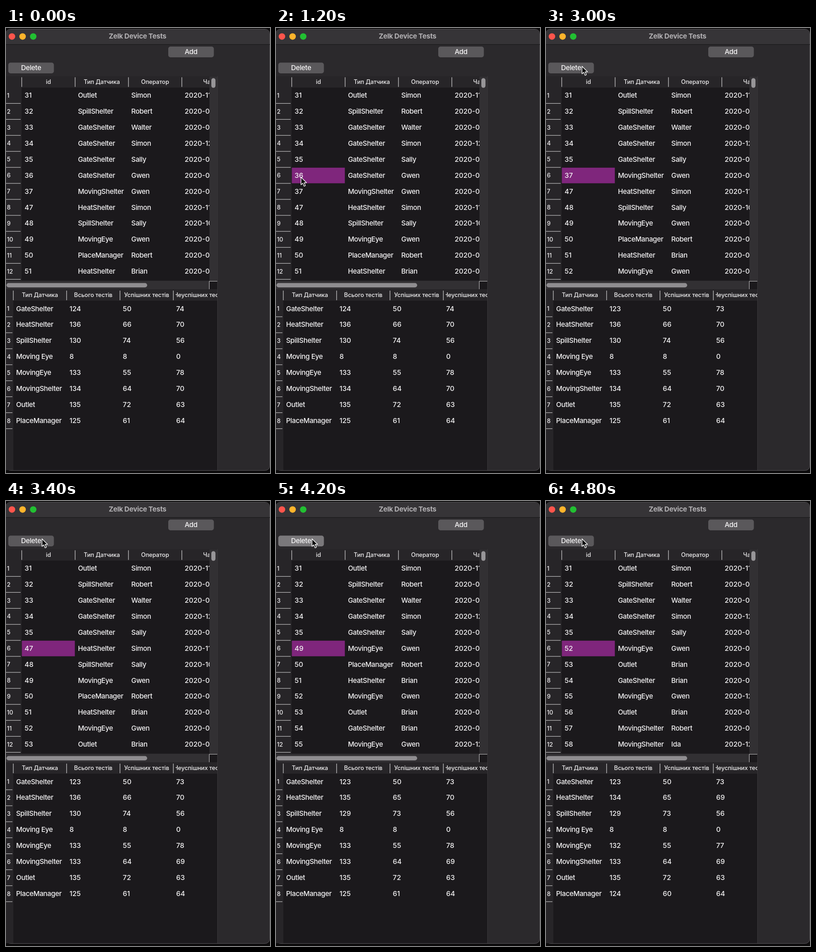
Recreate the animation shown at these times as an HTML page. Size 576 by 971 pixels, loop 5 s.

```html
<!DOCTYPE html>
<html lang="uk">
<head>
<meta charset="utf-8">
<style>
html, body { margin: 0; width: 100%; height: 100%; overflow: hidden; background: #0b0a0b; }
svg { display: block; width: 576px; height: 971px; }
text { font: 500 15.1px Inter, "Open Sans", sans-serif; letter-spacing: -.38px; fill: #f4f3f4; }
.num { letter-spacing: 0; }
.head { font-size: 12.8px; letter-spacing: -.1px; fill: #efeeef; }
.title { font-weight: 700; letter-spacing: -.25px; fill: #b3b1b4; }
.mid { text-anchor: middle; }
</style>
</head>
<body>
<svg id="stage" viewBox="0 0 576 971"></svg>
<script>
const STEP = 200, LOOP = 5000, COL = 116.4, ROW = 34.9;

const kinds = {
  G: 'GateShelter', H: 'HeatShelter', S: 'SpillShelter', X: 'Moving Eye',
  E: 'MovingEye', M: 'MovingShelter', O: 'Outlet', P: 'PlaceManager'
};
// id, kind, operator, month
const tests = `31 O Simon 11|32 S Robert 0|33 G Walter 0|34 G Simon 12|35 G Sally 0
36 G Gwen 0|37 M Gwen 0|47 H Simon 11|48 S Sally 10|49 E Gwen 0|50 P Robert 0|51 H Brian 0
52 E Gwen 0|53 O Brian 0|54 G Brian 0|55 E Gwen 12|56 O Brian 0|57 M Robert 0|58 M Ida 12`
  .split(/[|\n]/).map(r => r.split(' '));
// kind: passed, failed
const totals = {
  G: [50, 74], H: [66, 70], S: [74, 56], X: [8, 0],
  E: [55, 78], M: [64, 70], O: [72, 63], P: [61, 64]
};
// time, kind, index of the count that drops (0 passed, 1 failed)
const deletions = [
  [3000, 'G', 1], [3400, 'M', 1], [3800, 'H', 0], [4200, 'S', 0],
  [4400, 'E', 1], [4600, 'P', 0], [4800, 'H', 1]
];
const presses = [[2800, 3000], [3600, 3800], [4000, 4400]];
// time, x, y of the pointer tip
const pointer = [
  [400, 395, 806], [600, 63, 381], [800, 53, 340], [1000, 54, 325], [1600, 67, 159],
  [1800, 84, 107], [2000, 81, 87], [2200, 78, 83], [3200, 78, 82]
];

const rect = (x, y, w, h, fill, more = '') =>
  `<rect x="${x}" y="${y}" width="${w}" height="${h}" fill="${fill}" ${more}/>`;
const text = (x, y, s, cls = '') => `<text x="${x}" y="${y}" class="${cls}">${s}</text>`;
const clip = (id, x, y, w, h) => `<clipPath id="${id}">${rect(x, y, w, h, '#000')}</clipPath>`;
const clipped = (id, s) => `<g clip-path="url(#${id})">${s}</g>`;

function button(x, y, label, down) {
  return rect(x, y, 99.5, 23.5, down ? '#7a787b' : '#5a585b', 'rx="5"') +
    text(x + 49.7, y + 16.8, label, 'mid');
}

function headers(x, y, names) {
  return names.map((s, i) =>
    rect(x + i * COL - .5, y - 10, 1.2, 21, '#d0cfd0') +
    text(x + (i + .5) * COL, y + 4.4, s, 'head mid')).join('');
}

function rowNumbers(y, n, w) {
  let s = '';
  for (let i = 0; i < n; i++)
    s += text(2, y + i * ROW + 4.7, i + 1, 'head') +
      rect(0, y + (i + .5) * ROW - .5, w, 1.15, '#c4c3c4');
  return s;
}

const cells = (x, y, rows) => rows.map((r, i) =>
  r.map((s, j) => text(x + 6.2 + j * COL, y + i * ROW + 5.2, s, /^\d/.test(s) ? 'num' : ''))
    .join('')).join('');

function windowFrame(down) {
  const lights = ['#ff554c', '#ffb42c', '#22c032'].map((c, i) =>
    `<circle cx="${13 + i * 23.2}" cy="18.6" r="7.1" fill="${c}"/>`).join('');
  return rect(-.5, 2.5, 576, 963, '#2b292c', 'rx="10" stroke="#59575a"') +
    '<path d="M0 36V12Q0 3 9 3H566Q575 3 575 12V36Z" fill="#363437"/>' +
    rect(0, 35.5, 576, 1, '#151415') + lights +
    text(287, 23.4, 'Zelk Device Tests', 'title mid') +
    button(354, 40.5, 'Add', false) + button(5, 75.5, 'Delete', down);
}

function testTable(rows, selected) {
  const data = rows.map(([id, kind, who, month]) => [id, kinds[kind], who, '2020-' + month]);
  return rect(0, 105, 461, 466, '#272528') + rect(34, 130, 410, 421, '#1b191c') +
    (selected ? rect(34.6, 304.8, 115.6, 34, '#7f267c') : '') +
    clipped('upper', headers(34.3, 117.5, ['id', 'Тип Датчика', 'Оператор', 'Час']) +
      cells(34.3, 147, data)) +
    rowNumbers(147, 12, 32) +
    rect(444, 106, 17, 445, '#323033') + rect(448, 109.5, 9, 21, '#979598', 'rx="4.5"') +
    rect(0, 552, 444, 18, '#323033') + rect(1, 556.5, 307, 9.5, '#8f8d90', 'rx="4.7"') +
    rect(444, 552, 17, 18, '#1b191c') +
    '<path d="M443.5 570V552.5H461" fill="none" stroke="#c8c7c8"/>';
}

function summaryTable(counts) {
  const data = Object.entries(counts).map(([k, [ok, bad]]) => [kinds[k], ok + bad, ok, bad]);
  const names = ['Тип Датчика', 'Всього тестів', 'Успішних тестів'];
  return rect(0, 571, 461, 394, '#272528') + rect(16, 595, 445, 370, '#1b191c') +
    headers(15.8, 583, names) + rect(364.5, 573, 1.2, 21, '#d0cfd0') +
    clipped('last', text(15.8 + 3.5 * COL, 587.4, 'Неуспішних тестів', 'head mid')) +
    rowNumbers(612.5, 8, 14) + cells(15.8, 612.3, data);
}

function arrow(t) {
  const at = pointer.filter(p => p[0] <= t).pop();
  return at ? `<path transform="translate(${at[1]} ${at[2]}) scale(1.08)" fill="#0a0a0a"
    stroke="#fff" stroke-width="1.2" stroke-linejoin="round"
    d="M.5 .5V15.8L4 12.6L6.7 18.8L9.4 17.6L6.8 11.6H11.6Z"/>` : '';
}

function render(t) {
  const gone = deletions.filter(d => d[0] <= t);
  const rows = [...tests.slice(0, 5), ...tests.slice(5 + gone.length)].slice(0, 12);
  const counts = Object.fromEntries(Object.entries(totals).map(([k, v]) => [k, [...v]]));
  for (const [, kind, i] of gone) counts[kind][i]--;
  const down = presses.some(([a, b]) => t >= a && t < b);
  return '<defs>' + clip('upper', 0, 105, 444, 446) + clip('last', 370, 571, 91, 24) + '</defs>' +
    windowFrame(down) + testTable(rows, t >= 1200) + summaryTable(counts) +
    rect(461, 105, 1, 860, '#39373a') + arrow(t);
}

const stage = document.getElementById('stage');
let shown = -1;
function tick() {
  const t = Math.floor(performance.now() % LOOP / STEP) * STEP;
  if (t !== shown) stage.innerHTML = render(shown = t);
  requestAnimationFrame(tick);
}
tick();
</script>
</body>
</html>
```
